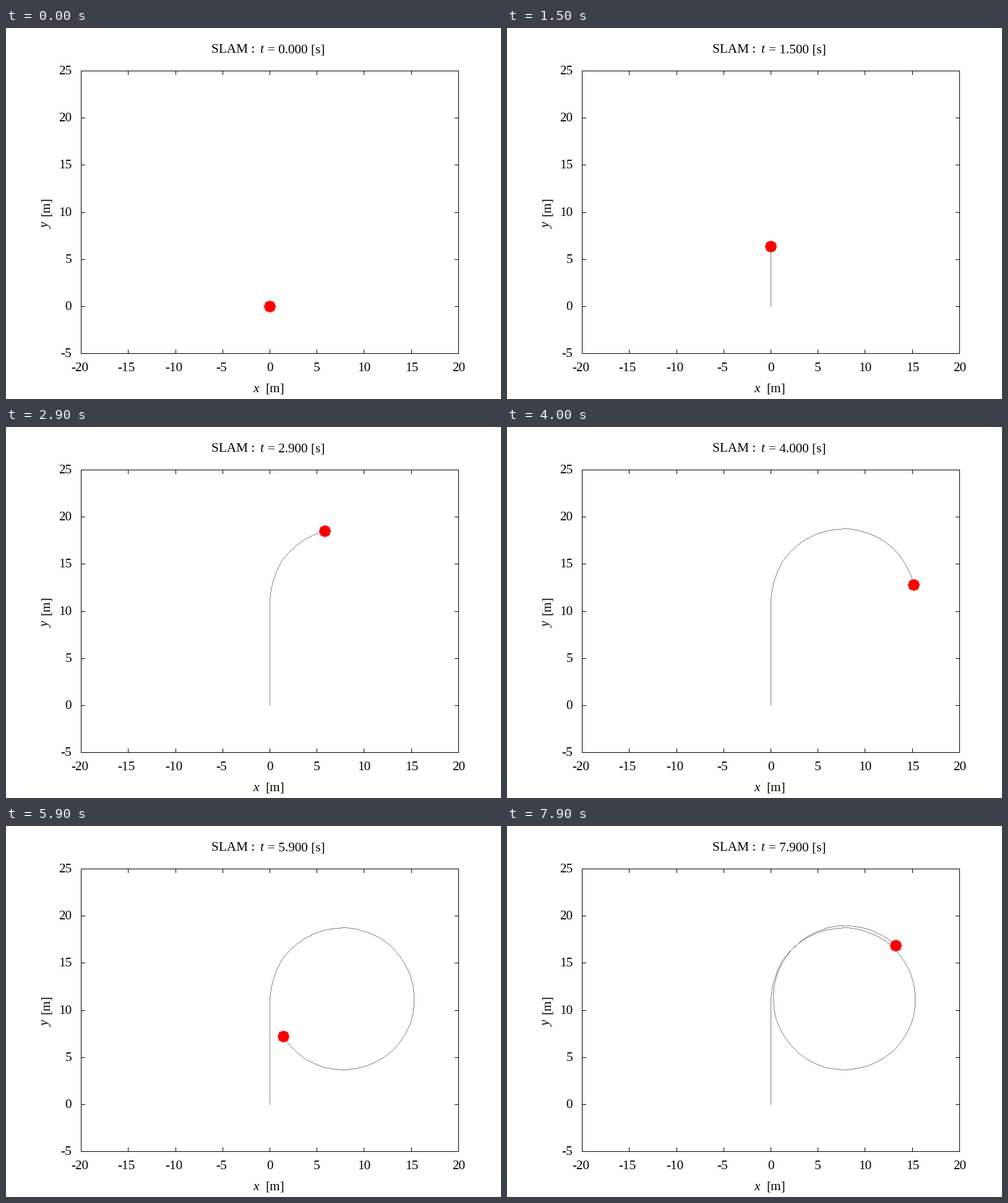
Recreate the animation shown at these times as a matplotlib script. Size 800x600 px, loop 8 s.

```python
import matplotlib.pyplot as plt
import numpy as np
from matplotlib.animation import FuncAnimation
from matplotlib.patches import Circle, Rectangle

W, H, DPI = 800, 600, 100
FRAMES, STEP = 80, 0.1
PX = 72 / DPI                       # points per pixel
LEFT, RIGHT, TOP, BOTTOM = 121, 731, 69, 526

V0, ACCEL, T_TURN = 0.16, 5.44, 1.99    # straight run, then turning
OMEGA, RADIUS, DRIFT = np.radians(83.66), 7.6, 0.055
CENTRE_Y = 11.09


def to_px(x, y):
    px = LEFT + (x + 20) * (RIGHT - LEFT) / 40
    py = BOTTOM - (y + 5) * (BOTTOM - TOP) / 30
    return np.rint(px).astype(int), np.rint(py).astype(int)


def position(t):
    """Robot position in metres: accelerate north, then circle clockwise."""
    s = np.maximum(t - T_TURN, 0)
    a = OMEGA * s
    x = RADIUS * (1 - np.cos(a)) + DRIFT * s
    y_run = V0 * t + ACCEL * t**2 / 2
    y_turn = CENTRE_Y + RADIUS * np.sin(a) + DRIFT * s
    return x, np.where(t < T_TURN, y_run, y_turn)


plt.rcParams["font.family"] = "Liberation Serif"
plt.rcParams["font.size"] = 21.33 * PX

fig = plt.figure(figsize=(W / DPI, H / DPI), dpi=DPI, facecolor="white")
ax = fig.add_axes([0, 0, 1, 1])
ax.axis("off")

# Trail layer: one hard-edged pixel per step along the path
layer = np.full((H, W, 4), 128, dtype=np.uint8)
layer[..., 3] = 0
trail = ax.imshow(layer, extent=(-0.5, W - 0.5, H - 0.5, -0.5),
                  aspect="auto", interpolation="nearest", zorder=3)
ax.set_xlim(-0.5, W - 0.5)
ax.set_ylim(H - 0.5, -0.5)


def line(xs, ys):
    ax.plot(xs, ys, color="black", lw=PX, snap=False,
            solid_capstyle="butt", zorder=2)


def label(x, y, text, **kw):
    kw = {"ha": "left", "va": "baseline", **kw}
    return ax.text(x, y, text, **kw)


# Axes box, ticks and labels
ax.add_patch(Rectangle((LEFT, TOP), RIGHT - LEFT, BOTTOM - TOP, fill=False,
                       ec="black", lw=PX, snap=False, zorder=2))
for v in range(-20, 21, 5):
    x = to_px(v, 0)[0]
    if abs(v) < 20:
        line([x, x], [BOTTOM, BOTTOM - 6.5])
        line([x, x], [TOP, TOP + 6.5])
    shift = -2.7 if v < 0 else 0.5 if v > 5 else 0
    label(x + shift, 554.5, str(v), ha="center")
for v in range(-5, 26, 5):
    y = to_px(0, v)[1]
    if -5 < v < 25:
        line([LEFT, LEFT + 6.5], [y, y])
        line([RIGHT, RIGHT - 6.5], [y, y])
    label(105.5, y + 5.5, str(v), ha="right")

label(398.5, 588.5, "x", style="italic")
label(418.5, 588.5, "[m]")
turned = dict(rotation=90, rotation_mode="anchor")
label(69.5, 323.5, "y", style="italic", **turned)
label(69.5, 303.5, "[m]", **turned)

label(331.5, 39.5, "SLAM :")
label(409.5, 39.5, "t", style="italic")
clock = label(422.5, 39.5, "")

times = np.arange(FRAMES) * STEP
track_x, track_y = to_px(*position(times))
robot = ax.add_patch(Circle((0, 0), 8.55, fc="red", ec="none",
                            antialiased=False, zorder=4))


def draw_segment(img, x0, y0, x1, y1):
    n = max(abs(x1 - x0), abs(y1 - y0)) + 1
    xs = np.rint(np.linspace(x0, x1, n)).astype(int)
    ys = np.rint(np.linspace(y0, y1, n)).astype(int)
    img[ys, xs, 3] = 255


def update(i):
    img = layer.copy()
    for k in range(i):
        draw_segment(img, track_x[k], track_y[k],
                     track_x[k + 1], track_y[k + 1])
    trail.set_data(img)
    clock.set_text(f"= {times[i]:.3f} [s]")
    robot.center = track_x[i], track_y[i]
    return clock, trail, robot


anim = FuncAnimation(fig, update, frames=FRAMES, interval=1000 * STEP,
                     repeat=True, repeat_delay=0)
plt.show()
```
